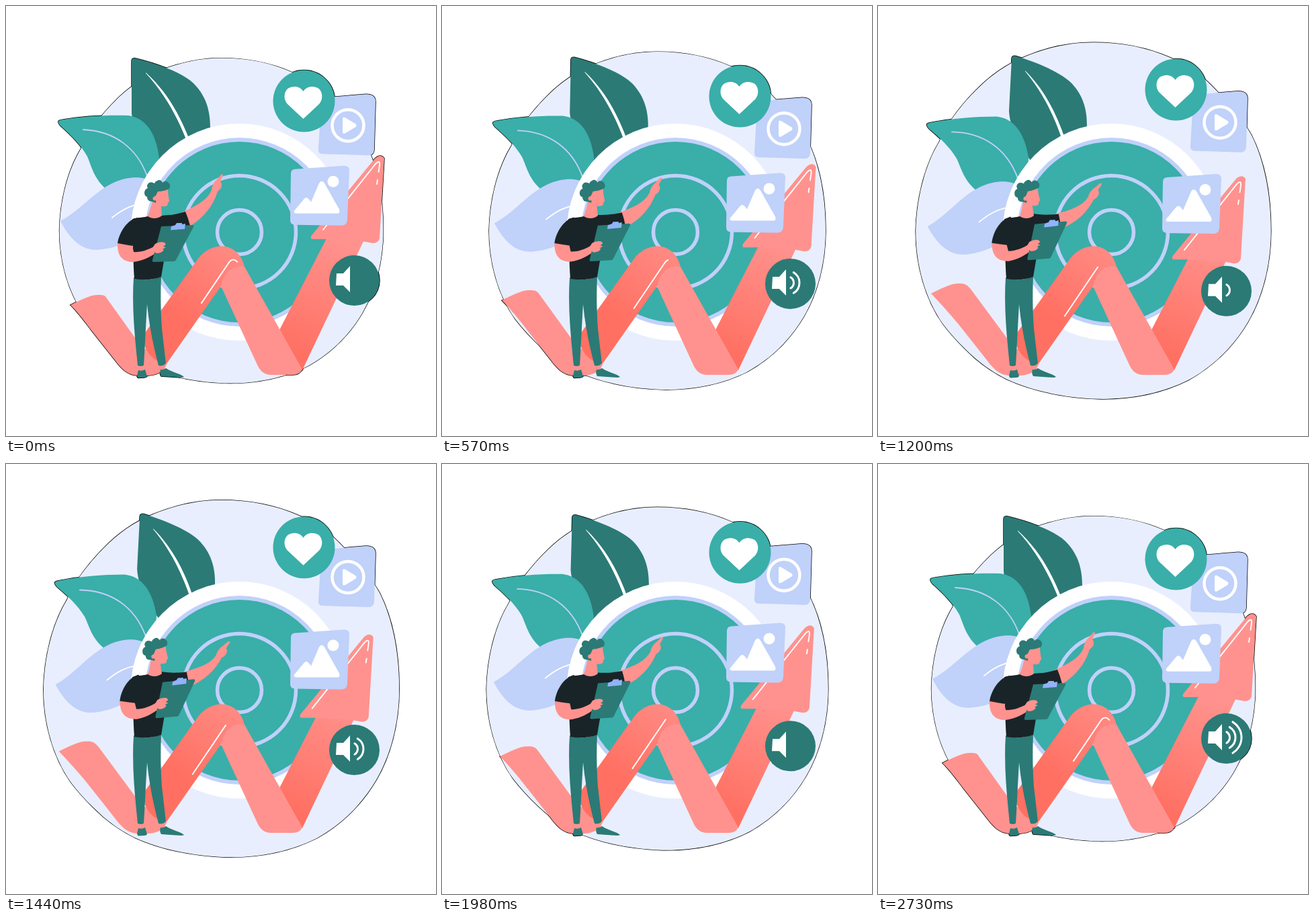
These frames come from a looping animation (640x640 px, 2760 ms). An HTML page:

```html
<!DOCTYPE html>
<html lang="en">
<head>
<meta charset="utf-8">
<title>Growth and audience illustration</title>
<style>
  html, body { margin: 0; width: 100%; height: 100%; overflow: hidden; background: #fff; }
  svg { display: block; width: 100%; height: 100%; }
  .teal { fill: #3aaea9; }
  .dark { fill: #2b7a76; }
  .lav { fill: #c0d1fa; }
  .pink { fill: #ff928e; }
  .shirt { fill: #192428; }
  .white { fill: #fff; }
  .line { fill: none; stroke: #fff; stroke-linecap: round; stroke-linejoin: round; }
  .ring { fill: none; stroke: #c0d1fa; stroke-width: 5.5; }
</style>
</head>
<body>
<svg viewBox="0 0 640 640">
  <defs>
    <linearGradient id="midFill" gradientUnits="userSpaceOnUse" x1="255" y1="460" x2="352" y2="322">
      <stop offset="0" stop-color="#ff7062"/><stop offset="1" stop-color="#ff928e"/>
    </linearGradient>
    <linearGradient id="shaftFill" gradientUnits="userSpaceOnUse" x1="425" y1="515" x2="502" y2="352">
      <stop offset="0" stop-color="#ff7062"/><stop offset="1" stop-color="#ff928e"/>
    </linearGradient>
  </defs>

  <!-- thin dark edge around the whole silhouette -->
  <use href="#art" stroke="#000" stroke-width="1.5"/>

  <g id="art">
    <path id="blob" fill="#e8eefd" d="M320 54C365 54 402 62 436 77C466 90 488 108 504 126C528 152 545 172 556 192C575 230 585 280 585 335C585 388 571 436 551 470C531 504 503 534 462 557C424 576 378 586 327 585C275 583 230 573 192 556C172 546 158 536 145 525C126 508 110 491 97 474C70 436 56 385 56 335C57 290 68 240 91 202C98 186 107 171 117 158C128 144 136 135 145 126C167 103 192 86 219 75C250 62 285 54 320 54Z"/>

    <g id="leafDark">
      <path class="dark" d="M187 82Q187 77 193 78C218 84 260 97 279 115C300 136 304 160 304 182L300 245L235 245C212 222 190 190 187 160Z"/>
      <path class="white" d="M208 99C237 125 257 158 273 199L269 201C254 162 234 128 208 100Z"/>
    </g>
    <g id="leafTeal">
      <path class="teal" d="M78 173Q77 170 85 169C115 164 150 162 182 163C206 166 223 186 228 226L220 290L165 283C132 266 129 242 121 224C111 206 96 192 84 181Q79 177 78 173Z"/>
      <path class="line" style="stroke:#c0d1fa" stroke-width="1.8" d="M115 184C161 186 196 211 211 256"/>
    </g>
    <g id="leafLav">
      <path class="lav" d="M81 320C110 305 130 277 160 263C185 252 207 254 217 262L205 335C186 350 165 361 135 363C110 363 94 345 81 320Z"/>
      <path class="line" stroke-width="1.8" d="M158 315C173 303 185 297 202 294"/>
    </g>

    <circle class="white" cx="347" cy="336.5" r="161.5"/>
    <circle class="lav" cx="347.5" cy="336.5" r="140.5"/>
    <circle class="teal" cx="347.5" cy="336.5" r="134.5"/>
    <circle class="ring" cx="347.5" cy="336.5" r="84"/>
    <circle class="ring" cx="347.5" cy="336.5" r="33"/>

    <path id="tail" class="pink"/>
    <path fill="url(#midFill)" d="M203 492L286 376C306 349 346 350 355 388L320 417L240 531C222 531 207 519 203 492Z"/>
    <path fill="url(#shaftFill)" d="M441 542L400 530L404 488L477 346L535 344Z"/>
    <path class="pink" d="M320 417C325 396 337 385 355 388L441 541Q437 549 427 549L393 549Q380 548 374 534Z"/>
    <path id="shine" class="line" stroke-width="1.9" stroke-dasharray="88 200" d="M277.5 462L331 383C335 376 341 376 345 382"/>
    <g id="head">
      <path class="pink" d="M455 347Q452 344 456 340L549 227Q558 219 563 227L556 346Q554 353 546 353L530 350L476 347Z"/>
      <path class="line" stroke-width="1.9" d="M472 333L550 235Q557 228 556 237L554.5 247M553 259L552 265"/>
    </g>

    <g id="play">
      <path class="lav" d="M476 136L536 131Q550 131 550 142L548 214Q547 222 540 222L472 220Q464 220 465 212L469 143Q470 136 476 136Z"/>
      <circle class="line" stroke-width="4.5" cx="509" cy="177.5" r="23.5"/>
      <path class="white" d="M501 168Q501 164 505 166L520 175Q523 177.500 520 180L505 189Q501 191 501 187Z"/>
    </g>
    <g id="heart">
      <circle class="teal" cx="443.5" cy="141.5" r="46"/>
      <path class="white" d="M442.500 168L419 146C412 138 414 126 421 122C429 118 438 120 442.500 127C447 120 456 118 464 122C471 126 473 138 466 146Z"/>
    </g>
    <g id="photo">
      <path class="lav" d="M431 243L503 238Q511 238 511 245L508 319Q507 327 499 327L431 326Q423 326 423 319L424 250Q424 243 431 243Z"/>
      <circle class="white" cx="487" cy="261.5" r="8.5"/>
      <path class="white" d="M429 305L444 287Q447 284 450 287L454 292L466 264Q470 258 474 264L496 303Q498 309 493 309L433 309Q427 309 429 305Z"/>
    </g>
    <g id="sound">
      <circle class="dark" cx="518.5" cy="408.5" r="37.5"/>
      <path class="white" d="M492 398L502 398L512 387L512 426L502 416L491 416Z"/>
      <g id="waves"></g>
    </g>

    <path class="pink" d="M197 532H205V543H197ZM227 532H237L236 543H230Z"/>
    <path class="dark" d="M197 542Q202 544 207 541L210 551Q209 553 206 553L197 553.500Q195 553 195 550ZM230 541Q234 542 238 539C246 545 260 547 265 552Q264 553 260 553L231 551Q228 547 230 541Z"/>
    <path class="dark" d="M190 404C205 409 218 408 231 402C230 430 230 450 232 480L238 532Q233 537 227 535C219 505 213 475 210 444C208 475 207 505 205 535Q200 537 196 535C192 495 187 450 190 404Z"/>

    <g id="reach">
      <path class="pink" d="M262 307C285 297 300 288 306 274C307 266 310 262 314 258L320 251Q323 249 323 252L319 261C323 266 321 272 315 276C308 298 295 314 275 327L262 329Z"/>
      <path class="shirt" d="M230 312C245 312 257 309 267 306Q271 315 274 327C260 330 246 333 232 334Z"/>
    </g>
    <g id="face">
      <path class="pink" d="M219 284L223 276L241 272C241 282 243 288 243 291L241 293C241 298 238 299 231 298L232 314C225 320 214 318 210 314C214 306 216 298 218 290Z"/>
      <path class="dark" d="M223 293Q224 288 221 284L223 282L226 276C233 276 239 274 243 272Q246 266 241 262Q236 259 233 263Q230 257 225 260Q222 261 221 264Q214 260 211 265Q209 268 211 271Q206 273 206 278Q206 283 210 284Q210 291 217 291Z"/>
      <circle class="pink" cx="221.5" cy="286.5" r="3"/>
    </g>
    <path class="shirt" d="M188 317C198 314 206 315 211 313C217 317 226 317 232 312L247 311C247 325 243 335 240 350L231 403C218 408 204 408 191 406C189 380 190 360 187 345Z"/>
    <g id="hold">
      <path class="pink" d="M166 352C165 374 175 381 190 381C205 379 215 373 224 367L222 357C210 364 198 367 190 366L188 356Z"/>
      <path class="shirt" d="M196 315C180 318 168 338 166 353Q176 355 188 357L202 342Z"/>
      <path class="dark" d="M231 328L278 326Q280 327 279 329L253 378Q252 380 250 380L220 381Q217 381 218 378Z"/>
      <path fill="#91b3fa" d="M246 328L252 326L254 323H262V325L267 324L266 332L245 333.500Z"/>
      <path class="pink" d="M216 363L222 354Q229 350 236 352L238 355L234 358L238 359L233 362L235 363Q232 368 224 368Z"/>
    </g>
  </g>
</svg>
<script>
const LOOP = 2760, STEP = 30, SWING = 2730, BEAT = SWING / 3;
const $ = id => document.getElementById(id);

const waves = [9.5, 18, 27].map(r => {
  const p = document.createElementNS('http://www.w3.org/2000/svg', 'path');
  const x = 514 + r * Math.cos(1.03), y = r * Math.sin(1.03);
  p.setAttribute('class', 'line');
  p.setAttribute('stroke-width', 3);
  p.setAttribute('d', `M${x} ${407 - y}A${r} ${r} 0 0 1 ${x} ${407 + y}`);
  $('waves').append(p);
  return p;
});

const set = (id, value) => $(id).setAttribute('transform', value);
const turn = (id, deg, x, y) => set(id, `rotate(${deg} ${x} ${y})`);
const move = (id, x, y) => set(id, `translate(${x} ${y})`);
const wave = (t, peak) => Math.cos(2 * Math.PI * (t - peak) / SWING);

function tailPath(s) {
  const d = 17.5 * s;
  const p = (x, y) => `${x - d} ${y - d}`;
  return `M${p(96, 445)}C${p(110, 438)} ${p(125, 430)} ${p(137, 430)}` +
    `C${p(146, 430)} ${p(148, 431)} ${150 - 13 * s} ${435 - 15 * s}` +
    'L205 512L222 500L240 531C236 544 226 549 212 550L195 550' +
    `C180 549 171 539 162 527L128 484C116 468 ${p(107, 456)} ${p(96, 445)}Z`;
}

function draw(t) {
  const s = (1 - wave(t, -20)) / 2;
  const k = (482 + 48 * s) / 529;
  set('blob', `translate(320.5 319.5) scale(${k}) translate(-320.5 -319.5)`);

  turn('leafDark', 3 * s, 266, 315);
  turn('leafTeal', -1.75 * s, 228, 355);
  turn('leafLav', -1.15 * s, 490, 700);

  $('tail').setAttribute('d', tailPath(s));
  $('shine').setAttribute('stroke-dashoffset', -24 * (1 - s));
  move('head', -16.5 * s, 31 * s);

  turn('reach', 10 * s, 248, 318);
  turn('face', -5 * s, 222, 312);
  turn('hold', -2.9 * s, 165, 285);

  move('heart', 0, -17.5 * s);
  move('play', 0, 9 * wave(t, 485) - 3.7);
  move('photo', 0, 8.7 * wave(t, 950) + 4.8);
  move('sound', 0, 8.6 * wave(t, 1440) + 8.5);

  const count = t < SWING ? Math.floor(4 * (t % BEAT) / BEAT) : 3;
  waves.forEach((w, i) => w.setAttribute('visibility', i < count ? 'visible' : 'hidden'));
}

function tick() {
  const t = performance.now() % LOOP;
  draw(Math.floor(t / STEP) * STEP);
  requestAnimationFrame(tick);
}
tick();
</script>
</body>
</html>
```
